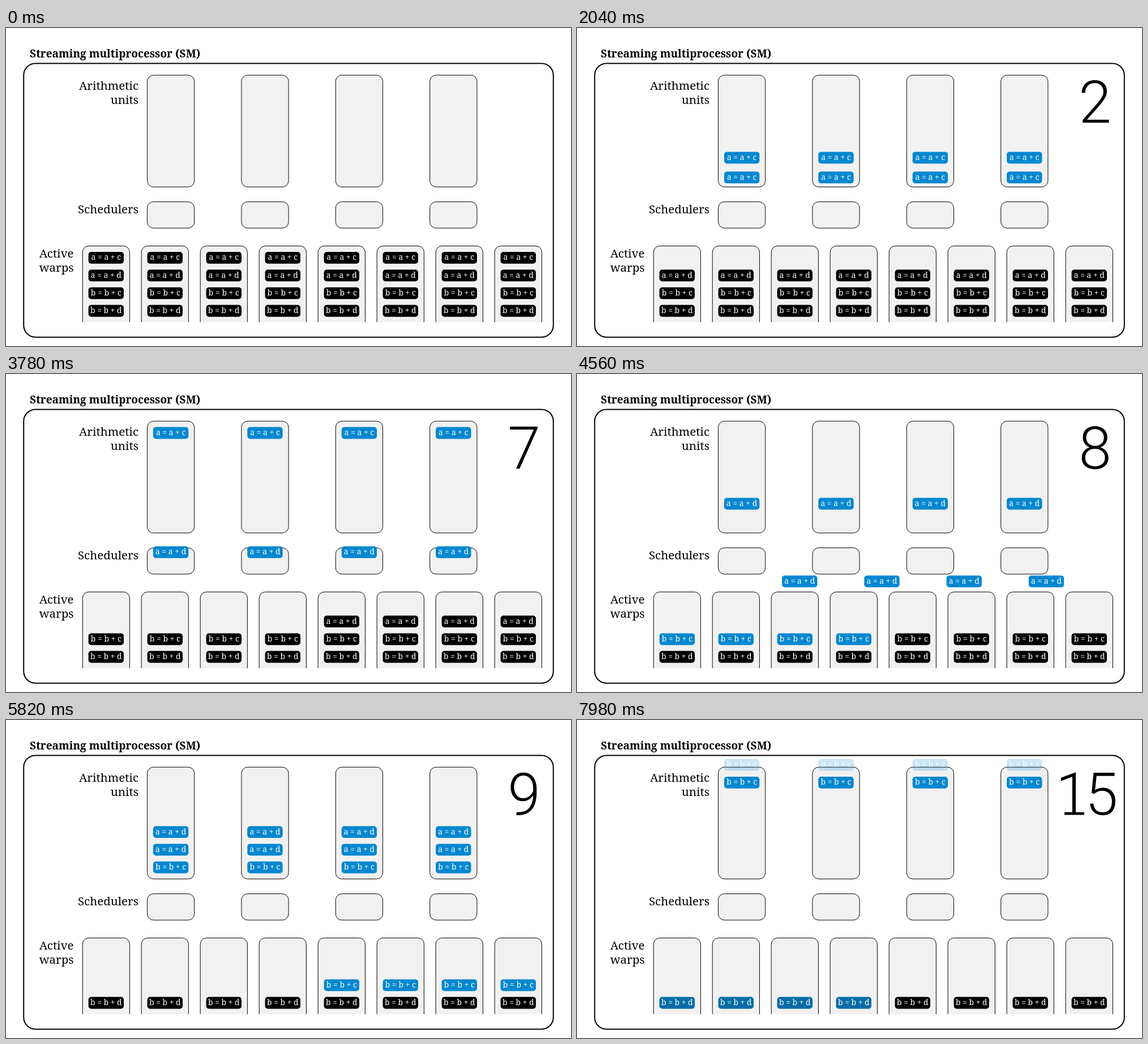
These frames come from a looping animation (998x561 px, 8000 ms). An HTML page:

```html
<!DOCTYPE html>
<html lang="en">
<head>
<meta charset="utf-8">
<title>Streaming multiprocessor</title>
<style>
  html, body { margin: 0; width: 100%; height: 100%; overflow: hidden; background: #fff; }
  svg { display: block; width: 100vw; height: 100vh; }
  text { font-family: "Noto Serif", "Liberation Serif", serif; }
  .title { font-size: 19px; font-weight: 700; }
  .label { font-size: 20.5px; text-anchor: end; }
  .op { font-size: 13.9px; fill: #fff; text-anchor: middle; }
  .digit { font: 300 104px Roboto, "Open Sans", sans-serif; text-anchor: middle; }
  .box { fill: #f1f1f1; stroke: #000; stroke-width: 1; }
</style>
</head>
<body>
<svg id="stage" viewBox="0 0 998 561">
  <rect x="31.2" y="62.4" width="935.6" height="483" rx="21" fill="#fff" stroke="#000" stroke-width="2"/>
  <text class="title" x="42" y="52">Streaming multiprocessor (SM)</text>
  <text class="label" x="234" y="109">Arithmetic</text>
  <text class="label" x="234" y="134">units</text>
  <text class="label" x="234" y="327">Schedulers</text>
  <text class="label" x="119.5" y="405">Active</text>
  <text class="label" x="119.5" y="430">warps</text>
</svg>
<script>
const LOOP = 8000, STEP = 30;
const SHIFT = 100;   // one slot up in an arithmetic unit
const LEG = 215;     // warp to scheduler, scheduler to unit
const PITCH = 31.2, TILE_W = 62.4, TILE_H = 20.8;
const WARP_Y = 395, SCHED_Y = 319.3, UNIT_Y = 249.6;
const OPS = ["a = a + c", "a = a + d", "b = b + c", "b = b + d"];
const BLUE = [4, 135, 208];

// start time of each clock cycle
const CYCLE = { 1: 450, 2: 1393, 3: 2313, 4: 2543, 5: 2780, 6: 2999, 7: 3233, 8: 4199,
  9: 5108, 10: 6038, 11: 6950, 12: 7187, 13: 7432, 14: 7670, 15: 7909 };
// cycle in which tiles are issued, and when they start to move
const ISSUE = { 1: 711, 2: 1640, 7: 3500, 8: 4429, 9: 5364, 10: 6290 };
const FIRST_ISSUE = [1, 7, 9, 15];

const stage = document.getElementById("stage");
const warpX = c => 176.8 + 104 * c;
const unitX = u => 291.1 + 166.4 * u;
const mix = (a, b, k) => a + (b - a) * k;

function ease(t, start, length) {
  const k = Math.min(1, Math.max(0, (t - start) / length));
  return k * k * (3 - 2 * k);
}

function add(name, attrs, parent = stage) {
  const el = document.createElementNS("http://www.w3.org/2000/svg", name);
  for (const key in attrs) el.setAttribute(key, attrs[key]);
  parent.appendChild(el);
  return el;
}

for (let u = 0; u < 4; u++) {
  const x = unitX(u) - 41.6;
  add("rect", { class: "box", x, y: 83.2, width: 83.2, height: 197.2, rx: 11 });
  add("rect", { class: "box", x, y: 306.6, width: 83.2, height: 46.4, rx: 11 });
}
for (let c = 0; c < 8; c++) {
  const x = warpX(c) - 41.6;
  add("path", { class: "box", d: `M${x} 519V395.5a11 11 0 0 1 11-11h61.2a11 11 0 0 1 11 11V519` });
}

const tiles = [];
for (let row = 0; row < 4; row++) {
  for (let col = 0; col < 8; col++) {
    const half = col >> 2;
    const g = add("g", {});
    const rect = add("rect", { x: -TILE_W / 2, y: 0, width: TILE_W, height: TILE_H, rx: 5 }, g);
    add("text", { class: "op", x: 0, y: 14.4 }, g).textContent = OPS[row];
    const issue = FIRST_ISSUE[row] + half;
    // a tile lights up once the tile it depends on is done
    const ready = row === 0 ? 239
      : row === 2 ? ISSUE[7 + half] + 2 * LEG
      : CYCLE[issue] ?? Infinity;
    tiles.push({ g, rect, row, col, issue, ready, fade: row === 0 ? 1 : SHIFT });
  }
}

const counter = [0, 1].map(() => ({
  text: add("text", { class: "digit", y: 167.2 }),
  foot: add("rect", { y: 162.6, width: 35, height: 4.8 })
}));

function drawTile(tile, t) {
  const { g, rect, row, col, issue, ready, fade } = tile;
  const lit = ease(t, ready, fade);
  const start = ISSUE[issue] ?? Infinity;
  const out = ease(t, start, LEG), up = ease(t, start + LEG, LEG);
  let slots = 0, last = 0;
  for (let k = 1; k <= 6; k++) {
    last = ease(t, CYCLE[issue + k] ?? Infinity, SHIFT);
    slots += last;
  }
  const x = mix(warpX(col), unitX(col % 4), out);
  const y = mix(mix(WARP_Y + PITCH * row, SCHED_Y, out), UNIT_Y, up) - PITCH * slots;
  g.setAttribute("transform", `translate(${x.toFixed(2)} ${y.toFixed(2)})`);
  g.setAttribute("opacity", 1 - last);
  rect.setAttribute("fill", `rgb(${BLUE.map(v => Math.round(v * lit))})`);
}

function drawCounter(t) {
  const n = Object.keys(CYCLE).filter(k => CYCLE[k] <= t).length;
  const digits = n ? String(n) : "";
  const centers = digits.length === 2 ? [878.5, 926.5] : [915];
  counter.forEach(({ text, foot }, i) => {
    const d = digits[i] ?? "", x = centers[i] ?? 0, one = d === "1";
    text.textContent = d;
    text.setAttribute("x", one ? x - 4 : x);
    foot.setAttribute("x", x - 17.5);
    foot.setAttribute("visibility", one ? "visible" : "hidden");
  });
}

function draw(now) {
  const t = Math.floor((now % LOOP) / STEP) * STEP;
  for (const tile of tiles) drawTile(tile, t);
  drawCounter(t);
}

const begin = performance.now();
function tick() {
  draw(performance.now() - begin);
  requestAnimationFrame(tick);
}
tick();
</script>
</body>
</html>
```
